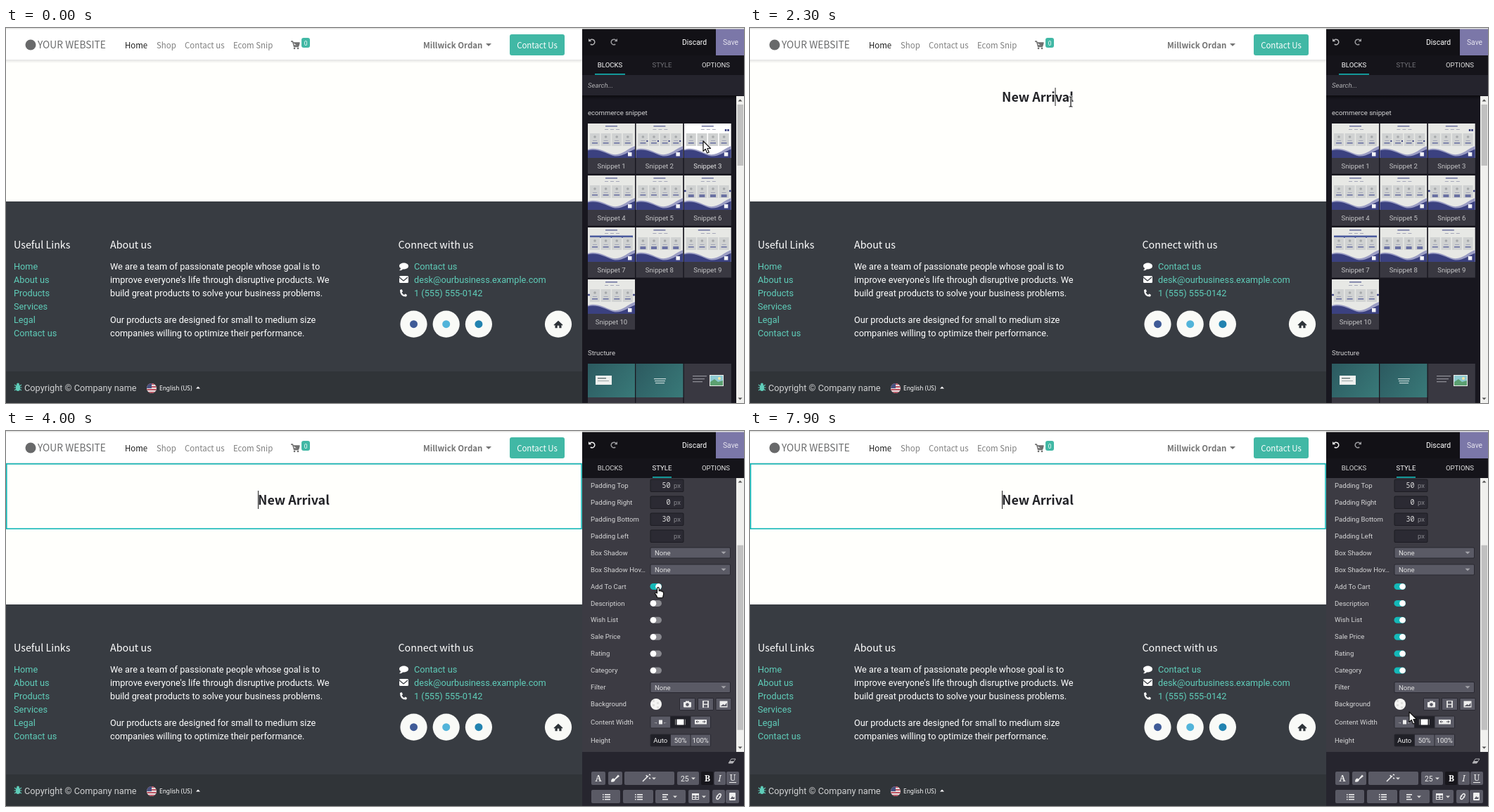
Recreate the animation shown at these times as an HTML page with a canvas. Size 1049x534 px, loop 8 s.

```html
<!DOCTYPE html>
<html lang="en">
<head>
<meta charset="utf-8">
<title>Website builder</title>
<style>
html, body { margin: 0; width: 100%; height: 100%; overflow: hidden; background: #fffffc; }
canvas { display: block; width: 1049px; height: 534px; }
</style>
</head>
<body>
<canvas id="stage" width="1049" height="534"></canvas>
<script>
const c = document.getElementById('stage').getContext('2d');
const LOOP = 8000, STEP = 100;
const ROBOTO = 'Roboto, sans-serif';
const SANS = '"Noto Sans CJK JP", "Noto Sans CJK SC", "Noto Sans CJK", sans-serif';
const MONO = '"Noto Sans Mono", monospace';
const TEAL = '#41b8a5', LINK = '#5fcdb9', CYAN = '#14b8b8', NAVY = '#3b4180';
const PANEL = '#3c3b43', BUTTON = '#5a5a65', DARK = '#25242d';
const body = '12.74px ' + ROBOTO, small = '9.6px ' + ROBOTO;
const nav = '11.43px ' + SANS, heading = '14.3px ' + SANS;

function text(s, x, y, font, color, align = 'left') {
  c.font = font;
  c.fillStyle = color;
  c.textAlign = align;
  c.fillText(s, x, y);
}
function box(x, y, w, h, color) {
  c.fillStyle = color;
  c.fillRect(x, y, w, h);
}
function round(x, y, w, h, r, color) {
  c.fillStyle = color;
  c.beginPath();
  c.roundRect(x, y, w, h, r);
  c.fill();
}
function disc(x, y, r, color) {
  c.fillStyle = color;
  c.beginPath();
  c.arc(x, y, r, 0, 7);
  c.fill();
}
function shape(d, x, y, fill, stroke, width = 1) {
  const p = new Path2D(d);
  c.save();
  c.translate(x, y);
  if (fill) { c.fillStyle = fill; c.fill(p); }
  if (stroke) { c.strokeStyle = stroke; c.lineWidth = width; c.lineJoin = 'round'; c.stroke(p); }
  c.restore();
}
function fade(y0, y1, x, w, color) {
  const g = c.createLinearGradient(0, y0, 0, y1);
  g.addColorStop(0, color);
  g.addColorStop(1, 'rgba(0,0,0,0)');
  box(x, y0, w, y1 - y0, g);
}
const down = (x, y, color, r = 4) => shape(`M${-r} ${-r / 2}H${r}L0 ${r / 2}Z`, x, y, color);
const up = (x, y, color, r = 4) => shape(`M${-r} ${r / 2}H${r}L0 ${-r / 2}Z`, x, y, color);

// Each side starts and ends on a whole dash, as a CSS border does
function dashed(x, y, w, h, color, fill) {
  const dash = 4.8, gap = 3.2, t = 1.6;
  const fit = len => {
    const n = Math.floor((len + gap) / (dash + gap));
    return (len - dash) / (n - 1);
  };
  if (fill) box(x, y, w, h, fill);
  const dx = fit(w), dy = fit(h);
  for (let a = 0; a < w - 1; a += dx) {
    box(x + a, y, dash, t, color);
    box(x + a, y + h - t, dash, t, color);
  }
  for (let a = 0; a < h - 1; a += dy) {
    box(x, y + a, t, dash, color);
    box(x + w - t, y + a, t, dash, color);
  }
}
function scrollbar(x, y0, y1, t0, t1, w = 11) {
  box(x, y0, w, y1 - y0, '#f0f0ee');
  box(x + 1.5, t0, w - 2.5, t1 - t0, '#c0c0c0');
  up(x + w / 2, y0 + 6, '#505050', 3);
  down(x + w / 2, y1 - 6, '#505050', 3);
}

// Piecewise linear value: keys are [time, ...values]
function along(keys, t) {
  let i = 0;
  while (i < keys.length - 1 && keys[i + 1][0] <= t) i++;
  const a = keys[i], b = keys[i + 1];
  if (!b) return a;
  const k = (t - a[0]) / (b[0] - a[0]);
  return a.map((v, n) => n && typeof v === 'number' ? v + (b[n] - v) * k : v);
}

function header(dx, dragging) {
  box(0, 1, 819, 45, '#ffffff');
  fade(45, 50, 0, 819, 'rgba(0,0,0,.11)');
  disc(35, 24, 7.5, '#68696a');
  text('YOUR WEBSITE', 45, 29, '500 13.8px ' + SANS, '#6a6b6c');
  text('Home', 169, 28.5, nav, '#1c1c1c');
  [['Shop', 214], ['Contact us', 254], ['Ecom Snip', 323]].forEach(([s, x]) => text(s, x, 28.5, nav, '#7f7f7f'));
  shape('M0 0H2.5L4.5 7.5H11M3 2H12L11 6H4', 405, 19, '#707070', '#707070', 1.4);
  disc(410, 29, 1.3, '#707070');
  disc(415, 29, 1.3, '#707070');
  round(420, 14, 12, 14, 3, TEAL);
  text('0', 426, 24.5, '8.5px ' + SANS, '#fff', 'center');
  text('Millwick Ordan', 593 + dx, 28.5, 'bold ' + nav, '#747474');
  down(686 + dx, 24, '#747474');
  round(716 + dx, 9, 78, 30, 3, TEAL);
  text('Contact Us', 755 + dx, 28.5, nav, '#fff', 'center');
  if (dragging) {
    const fill = 'rgba(120,125,175,.22)';
    c.save();
    c.beginPath();
    c.rect(0, 2, 819, 60);
    c.clip();
    dashed(697 + dx, -3, 97, 24, '#111', fill);
    dashed(697 + dx, 27, 97, 24, '#111', fill);
    c.restore();
  }
}

function footer(dy, narrow) {
  const about = narrow ? 146 : 148, con = narrow ? -8 : 0, home = narrow ? 773 : 785;
  box(0, 247 + dy, 819, 242, '#383c42');
  box(0, 489 + dy, 819, 60, '#303438');
  c.save();
  c.translate(0, dy);
  text('Useful Links', 11, 313.5, heading, '#fff');
  text('About us', about, 313.5, heading, '#fff');
  text('Connect with us', 557.5 + con, 313.5, heading, '#fff');
  const row = i => 343.7 + 19.1 * i;
  ['Home', 'About us', 'Products', 'Services', 'Legal', 'Contact us']
    .forEach((s, i) => text(s, 11, row(i), body, LINK));
  ['We are a team of passionate people whose goal is to',
   "improve everyone's life through disruptive products. We",
   'build great products to solve your business problems.', '',
   'Our products are designed for small to medium size',
   'companies willing to optimize their performance.']
    .forEach((s, i) => text(s, about, row(i), body, '#fff'));
  c.translate(con, 0);
  ['Contact us', 'desk@ourbusiness.example.com', '1 (555) 555-0142']
    .forEach((s, i) => text(s, 580, row(i), body, LINK));
  shape('M-6 0C-6-6 7-6 7 0C7 4 1 5-1 4.500Q-3 7-6 6Q-4 5-4 3Q-6 2-6 0Z', 565, 339, '#fff');
  round(559, 353, 13, 10, 1.5, '#fff');
  shape('M-6-3L0 2L6-3', 565, 358, null, '#383c42', 1.2);
  shape('M-5-4L-2.500-5L-1-2L-2.500-.5Q-1 2 1 3L2.500 1.500L5 3L4 5.500Q-5 6-5-4Z', 565, 377, '#fff');
  ['#3f5b97', '#52b4da', '#2283b0'].forEach((color, i) => {
    disc(579.5 + 46.2 * i, 421.7, 19.1, '#f9faf7');
    disc(579.5 + 46.2 * i, 421.7, 5.5, color);
  });
  c.translate(-con, 0);
  disc(home, 421.7, 19.1, '#f9faf7');
  shape('M-6.500 1L0-5L6.500 1L5.500 2L4.500 1V5.500H1.300V2H-1.300V5.500H-4.500V1L-5.500 2Z', home, 421.7, '#2e3338');
  shape('M-5-4L-2-2M5-4L2-2M-5.500 0H5.500M-5 4L-2 2M5 4L2 2', 17, 512, null, LINK, 1.2);
  round(14, 508, 6, 9, 3, LINK);
  disc(17, 507.5, 2, LINK);
  text('Copyright © Company name', 26, 516.6, body, '#d0d1d2');
  c.save();
  c.beginPath();
  c.arc(207, 513, 7, 0, 7);
  c.clip();
  box(200, 506, 14, 14, '#e6dfdf');
  for (let i = 0; i < 4; i++) box(200, 506 + 4 * i, 14, 2, '#bb5262');
  box(200, 506, 7, 7, '#46507f');
  c.restore();
  text('English (US)', 218, 516, '8.4px "Noto Sans", sans-serif', '#fff');
  up(273, 512, '#fff', 3);
  c.restore();
}

// Block preview in units of 67 by 49
function preview(x, y, i, bright) {
  c.save();
  c.translate(x, y);
  c.beginPath();
  c.rect(0, 0, 67, 49);
  c.clip();
  box(0, 0, 67, 49, bright ? '#fff' : '#e7e8e5');
  box(i === 9 ? 20 : 25, 3, 17, 1.6, '#7479a4');
  for (let k = 0; k < 3; k++) box(24 + 8 * k, 8, 5, 1, '#a4a6b8');
  if (i === 3) { box(58, 8, 2.5, 3, NAVY); box(61.5, 8, 2.5, 3, NAVY); }
  if (i === 7) box(3, 11.5, 61, 3.5, '#4c5c9e');
  for (let k = 0; k < 4; k++) {
    const cx = 3 + 15.6 * k;
    box(cx, 14, 14, 18, '#d0d2d2');
    disc(cx + 7, 19, 1.8, '#a5a8aa');
    box(cx + 4, 24, 6, 1, '#a3a6b8');
    box(cx + 3, 27, 8, i === 6 || i === 8 ? 4 : 1.6, '#6a71a2');
    if (i === 2) box(cx + 12, 24, 2, 2, NAVY);
  }
  if (i === 6 || i === 10) { disc(1.5, 22, 1.5, NAVY); disc(65.5, 22, 1.5, NAVY); }
  shape('M0 37C12 33 22 39 34 43.500C47 47 56 36 67 32V49H0Z', 0, 0, '#9a9cc3');
  shape('M0 38.500C13 35 24 42 36 46C48 48.500 56 41 67 36.500V49H0Z', 0, 0, NAVY);
  box(57, 41, 5.5, 5.5, '#f4f4f8');
  c.restore();
}

function turnArrow(x, flip, color) {
  c.save();
  c.translate(x, 20);
  c.scale(flip, 1);
  c.strokeStyle = color;
  c.lineWidth = 1.5;
  c.beginPath();
  c.arc(0, 0, 3.8, -2.6, 2.2);
  c.stroke();
  shape('M-5-5V-.7H-.7Z', 0, 0, color);
  c.restore();
}

function sidebarTop(style) {
  box(819, 1, 230, 533, '#18171f');
  box(819, 1, 230, 38, '#121116');
  box(819, 39, 230, 28, '#15141a');
  turnArrow(833, 1, style ? '#f0f0f0' : '#b4b4b6');
  turnArrow(864, -1, '#9a9a9e');
  text('Discard', 961, 24, '10.4px ' + ROBOTO, '#fff');
  box(1009, 1, 40, 38, '#7b77a8');
  text('Save', 1030, 24, '10.4px ' + ROBOTO, '#e4e2ee', 'center');
  text('BLOCKS', 858.5, 55.5, small, style ? '#d8d8d8' : '#fff', 'center');
  text('STYLE', 932.5, 55.5, small, style ? '#fff' : '#747479', 'center');
  text('OPTIONS', 1009, 55.5, small, '#e2e2e2', 'center');
  box(style ? 919 : 837, 65, style ? 27 : 43, 1.6, CYAN);
}

function blocksPanel(hover) {
  box(819, 67, 230, 29, DARK);
  fade(96, 102, 819, 219, 'rgba(0,0,0,.5)');
  text('Search...', 827, 84.5, 'italic ' + small, '#b0b0b3');
  text('ecommerce snippet', 827, 123.5, small, '#d2d2d3');
  for (let i = 0; i < 10; i++) {
    const x = 827 + 68.4 * (i % 3), y = 136 + 74 * Math.floor(i / 3), on = hover === i + 1;
    box(x, y, 67, 71.5, '#393841');
    preview(x, y, i + 1, on);
    text('Snippet ' + (i + 1), x + 33.5, y + 64, small, on ? '#e4e4e4' : '#c4c4c6', 'center');
  }
  text('Structure', 827, 465.5, small, '#d2d2d3');
  for (let i = 0; i < 3; i++) {
    const x = 827 + 68.4 * i, g = c.createLinearGradient(x, 478, x + 67, 527);
    g.addColorStop(0, '#2c5a60');
    g.addColorStop(1, '#397a79');
    box(x, 478, 67, 56, '#393841');
    if (i < 2) box(x, 478, 67, 48, g);
  }
  box(838, 495, 23, 13, '#eef0ee');
  box(841, 498, 12, 1.5, '#68787a');
  box(841, 502, 16, 1, '#9aa6a6');
  for (let k = 0; k < 3; k++) {
    box(921 + k, 499 + 3 * k, 17 - 2 * k, 1.2, '#c8dada');
    box(976, 495 + 4 * k, 20 - 3 * k, 1.3, '#8c8c94');
  }
  box(1000, 494, 20, 16, '#eeeeec');
  box(1001, 495, 18, 14, '#8fcbd2');
  disc(1014, 499, 2, '#f3e6a2');
  shape('M0 14V9L6 5L11 9L18 7V14Z', 1001, 495, '#5b9f70');
  scrollbar(1038, 97, 534, 109, 196);
}

function select(y) {
  round(915.5, y - 8, 114.5, 16, 2, '#292831');
  round(916.5, y - 7, 112.5, 14, 1, BUTTON);
  text('None', 922, y + 3.5, small, '#e0e0e0');
  down(1020, y, '#a4a4aa', 3.5);
}
function toggle(y, on) {
  round(915.5, y - 4.5, 16.5, 9, 4.5, on ? CYAN : '#87878d');
  disc(on ? 927.5 : 920, y, 4.3, '#fff');
}
function group(y, marks) {
  round(915.5, y - 9, 86.5, 18, 2, '#292831');
  [916.5, 945, 973.5].forEach((x, i) => {
    const active = i === (marks ? 0 : 1);
    box(x, y - 8, 27.5, 16, active ? '#202027' : BUTTON);
    if (marks) text(marks[i], x + 13.7, y + 3.5, small, '#f0f0f0', 'center');
  });
}

function stylePanel(t) {
  box(819, 67, 230, 390, PANEL);
  c.save();
  c.beginPath();
  c.rect(819, 67, 230, 390);
  c.clip();
  const offset = along([[2600, 125], [2700, 92], [2800, 48], [2900, 12], [3000, 0]], t)[1] - (t >= 3700 ? 1 : 0);
  c.save();
  c.translate(0, offset);
  ['Padding Top', 'Padding Right', 'Padding Bottom', 'Padding Left', 'Box Shadow', 'Box Shadow Hov…',
   'Add To Cart', 'Description', 'Wish List', 'Sale Price', 'Rating', 'Category', 'Filter', 'Background']
    .forEach((s, i) => text(s, 831, 82 + 23.93 * i, small, '#d6d6d7'));
  ['50', '0', '30', ''].forEach((s, i) => {
    const y = 78.5 + 24 * i;
    round(915.5, y - 9, 48, 18.5, 2, '#1d1c23');
    round(916.5, y - 8, 46, 16.5, 1, '#2b2a33');
    text(s, 944.5, y + 3.7, '10px ' + MONO, '#dcdcdc', 'right');
    text('px', 949, y + 3.5, small, '#88888e');
  });
  select(174.5);
  select(198.5);
  [3700, 4200, 4500, 5100, 5500, 6300].forEach((at, i) => toggle(222.5 + 23.9 * i, t >= at));
  select(366);
  disc(924, 390, 8, '#f5f5f3');
  for (let i = 0; i < 4; i++) box(919 + (i % 2) * 6, 384 + i * 3, 3, 3, '#e0e0de');
  [957, 983, 1008.5].forEach(x => {
    round(x, 381, 23, 18, 2, '#292831');
    box(x + 1, 382, 21, 16, BUTTON);
  });
  round(963, 387, 11, 7.5, 1, '#eee');
  box(966, 385.5, 5, 2, '#eee');
  disc(968.5, 390.6, 2.3, BUTTON);
  box(990, 385, 9, 10, '#ddd');
  box(992, 386, 5, 3.5, BUTTON);
  box(992, 391, 5, 3.5, BUTTON);
  box(1014.5, 385.5, 11, 9, '#eee');
  shape('M0 6L4 3L6 4.500L9 1V6Z', 1015.5, 387, BUTTON);
  text('Content Width', 831, 418.5, small, '#d6d6d7');
  group(415.5);
  box(928, 412.5, 5, 6, '#eee');
  text('→', 921, 418, '7px ' + MONO, '#eee');
  text('←', 934.5, 418, '7px ' + MONO, '#eee');
  box(953.5, 411.5, 10, 8, '#fff');
  box(951, 411.5, 1, 8, '#888');
  box(965, 411.5, 1, 8, '#888');
  box(979, 412, 17, 6.5, '#eee');
  shape('M2 3H6M11 3H15M3.500 1.500L2 3L3.500 4.500M13.500 1.500L15 3L13.500 4.500', 979, 412, null, '#4a4a52', 1);
  text('Height', 831, 445, small, '#d6d6d7');
  group(441.5, ['Auto', '50%', '100%']);
  c.restore();
  const top = 162 - offset * .672;
  scrollbar(1038, 66, 457, top, top + 263);
  c.restore();
  toolbar();
}

function toolbar() {
  box(819, 457, 230, 77, '#26252e');
  shape('M0 6L4 0H10L6 6Z', 1027, 467, null, '#b4b4b8', 1);
  shape('M0 6L2 3H8L6 6Z', 1027, 467, '#b4b4b8');
  const key = (x, w, y, dark) => round(x, y, w, 19, 2, dark ? '#17161c' : BUTTON);
  [[832, 20], [856, 20], [879, 71], [954, 31], [988, 17.5, 1], [1006.5, 16.5], [1024, 18]]
    .forEach(([x, w, dark]) => key(x, w, 485, dark));
  [[832, 41], [877, 43], [923, 43], [970, 30], [1004, 18], [1023, 19]].forEach(([x, w]) => key(x, w, 511));
  const serif = '12px "Noto Serif", serif';
  text('A', 842, 499, 'bold ' + serif, '#eee', 'center');
  shape('M9 0L4 6L2 5Q-1 6-1 10Q4 11 5 7L11 2Z', 861, 489.5, '#eee');
  shape('M0 9L8 1M5 0L6 2M9 4L11 5M9-1L11 0', 905, 490, null, '#eee', 1.6);
  down(921, 495, '#ddd', 3);
  text('25', 959, 498.5, '10.4px ' + ROBOTO, '#eee');
  down(977, 495, '#ddd', 3);
  text('B', 997, 499, 'bold ' + serif, '#fff', 'center');
  text('I', 1014.5, 499, 'italic ' + serif, '#eee', 'center');
  text('U', 1033, 498, serif, '#eee', 'center');
  box(1028, 500, 10, 1, '#eee');
  [848, 894, 933].forEach((x, n) => {
    for (let k = 0; k < 3; k++) {
      const y = 517 + 3.4 * k;
      if (n < 2) box(x, y, 1.6, 1.6, '#eee');
      box(x + (n < 2 ? 3 : 0), y, n === 2 && k === 1 ? 6 : 8, 1.6, '#eee');
    }
  });
  down(951, 521, '#ddd', 3);
  box(975, 516, 10, 9, '#eee');
  for (let k = 0; k < 4; k++) box(976 + 4.7 * (k % 2), 519 + 3 * (k >> 1), 3.5, 2, BUTTON);
  down(992, 521, '#ddd', 3);
  shape('M0 4L4 0Q7 0 6 3L4 5M6 4L2 8Q-1 8 0 5L2 3', 1010, 516.5, null, '#eee', 1.5);
  round(1028, 515, 9, 11, 1, '#eee');
  shape('M0 5L3 1L4 3L6 2V5Z', 1029.5, 519, BUTTON);
}

function title(t) {
  if (t >= 2400 && t < 3700) {
    const x = t < 2500 ? 405 : 358;
    box(x, 85, 460 - x, 26, '#dadcea');
  }
  text('New Arrival', 358, 105, 'bold 17.9px ' + SANS, '#212226');
  const blink = [[3700, 4100], [4600, 4800], [5000, 6100], [6600, 7200], [7700, LOOP]];
  if (t >= 2100 && t < 2400) box(433.5, 85, 1, 26, '#222');
  if (blink.some(([a, b]) => t >= a && t < b)) box(358, 85, 1, 26, '#222');
}

const glyphs = {
  arrow: 'M0 0V14.500L3.300 11.400L5.600 17L8.200 16L5.900 10.500H10.500Z',
  hand: 'M-1.500 8V.8Q0-1.500 1.300 .8V4.800Q3 3.200 4 5.200Q5.500 4.200 6 6Q7.500 5.800 7.600 7.500V10Q7 12 6.500 14.500H-1Q-2 11.500-4.500 8.500Q-4 6.200-1.500 8Z',
  grab: 'M-5.500 0Q-5-3-3.500-2Q-4-5-1-4Q1-6 2.500-4Q5-5 5-2.500Q7-2 6 1Q5 3 4.500 5H-3Q-4 3-6 1.500Q-7 0-5.500 0Z',
  beam: 'M-2.500-7H-.8L0-6L.8-7H2.500M0-6V6M-2.500 7H-.8L0 6L.8 7H2.500'
};

const path = [
  [0, 991, 161, 'arrow'], [600, 991, 161, 'arrow'], [700, 925, 157, 'grab'], [800, 808, 147, 'grab'],
  [900, 672, 128, 'grab'], [1000, 550, 108, 'grab'], [1100, 468, 100, 'grab'], [1200, 439, 98, 'grab'],
  [1500, 439, 98, 'beam'], [1800, 966, 314, 'arrow'], [1900, 966, 314, 'arrow'], [2000, 620, 180, 'arrow'],
  [2100, 434, 104, 'beam'], [2200, 434, 104, 'beam'], [2300, 456, 105, 'beam'], [2500, 365, 104, 'beam'],
  [2600, 365, 104, 'beam'], [2700, 620, 150, 'arrow'], [3000, 973, 230, 'arrow'], [3100, 973, 230, 'arrow'],
  [3500, 927, 221, 'hand'], [4000, 927, 223, 'hand'], [4200, 927, 245, 'hand'], [4500, 927, 269, 'hand'],
  [4800, 927, 273, 'hand'], [5100, 928, 292, 'hand'], [5200, 928, 292, 'hand'], [5500, 926, 320, 'hand'],
  [5700, 926, 320, 'hand'], [5900, 926, 323, 'hand'], [6000, 926, 323, 'hand'], [6300, 927, 344, 'hand'],
  [6400, 927, 344, 'hand'], [6900, 933, 350, 'arrow'], [7000, 933, 350, 'arrow'], [7500, 937, 400, 'arrow']
];

function cursor(x, y, kind) {
  if (kind === 'beam') {
    shape(glyphs.beam, x, y, null, '#fff', 3);
    shape(glyphs.beam, x, y, null, '#111', 1.2);
    return;
  }
  shape(glyphs[kind], x, y, '#fff', '#111', 1.2);
  if (kind === 'grab') shape('M-2.500-2V0M.5-3V-.5M3-2.500V-.5', x, y, null, '#111', 1);
}

function carried(t, x, y) {
  const [, dx, dy, size, turn] = along([[700, 36, 0, 1.03, -.035], [800, 32, 0, 1.035, -.044], [1200, 2.5, -5, 1.09, -.054]], t);
  c.save();
  c.translate(x + dx, y + dy);
  c.rotate(turn);
  c.scale(size, size);
  c.shadowColor = 'rgba(0,0,0,.35)';
  c.shadowBlur = 18;
  c.shadowOffsetY = 6;
  box(-33.5, -24.5, 67, 49, '#fff');
  c.shadowColor = 'transparent';
  preview(-33.5, -24.5, 3, true);
  c.restore();
}

function draw(t) {
  const dragging = t >= 700 && t < 1500, zone = t >= 700 && t < 900, style = t >= 2400;
  box(0, 0, 1049, 534, '#fffffc');
  footer(zone ? 37 : 0, zone);
  header(zone ? -12 : 0, dragging);
  if (zone) {
    dashed(15, 62, 776, 206, '#8f8f8f', '#e4e6eb');
    text('DRAG BUILDING BLOCKS HERE', 403, 170.7, '16px ' + ROBOTO, '#96979a', 'center');
    scrollbar(807, 1, 534, 13, 490, 12);
  } else if (t >= 900) {
    title(t);
  }
  if (style) {
    c.strokeStyle = CYAN;
    c.lineWidth = 1.6;
    c.strokeRect(.8, 46.8, 817.2, 92.4);
  }
  sidebarTop(style);
  if (style) stylePanel(t); else blocksPanel(t < 700 ? 3 : 0);
  box(0, 0, 1049, 1.5, '#e2e2e0');
  const [, x, y, kind] = along(path, t);
  if (dragging) carried(t, x, y);
  cursor(x, y, kind);
}

const start = performance.now();
function tick() {
  const t = (performance.now() - start) % LOOP;
  draw(Math.floor(t / STEP) * STEP);
  requestAnimationFrame(tick);
}
tick();
</script>
</body>
</html>
```
